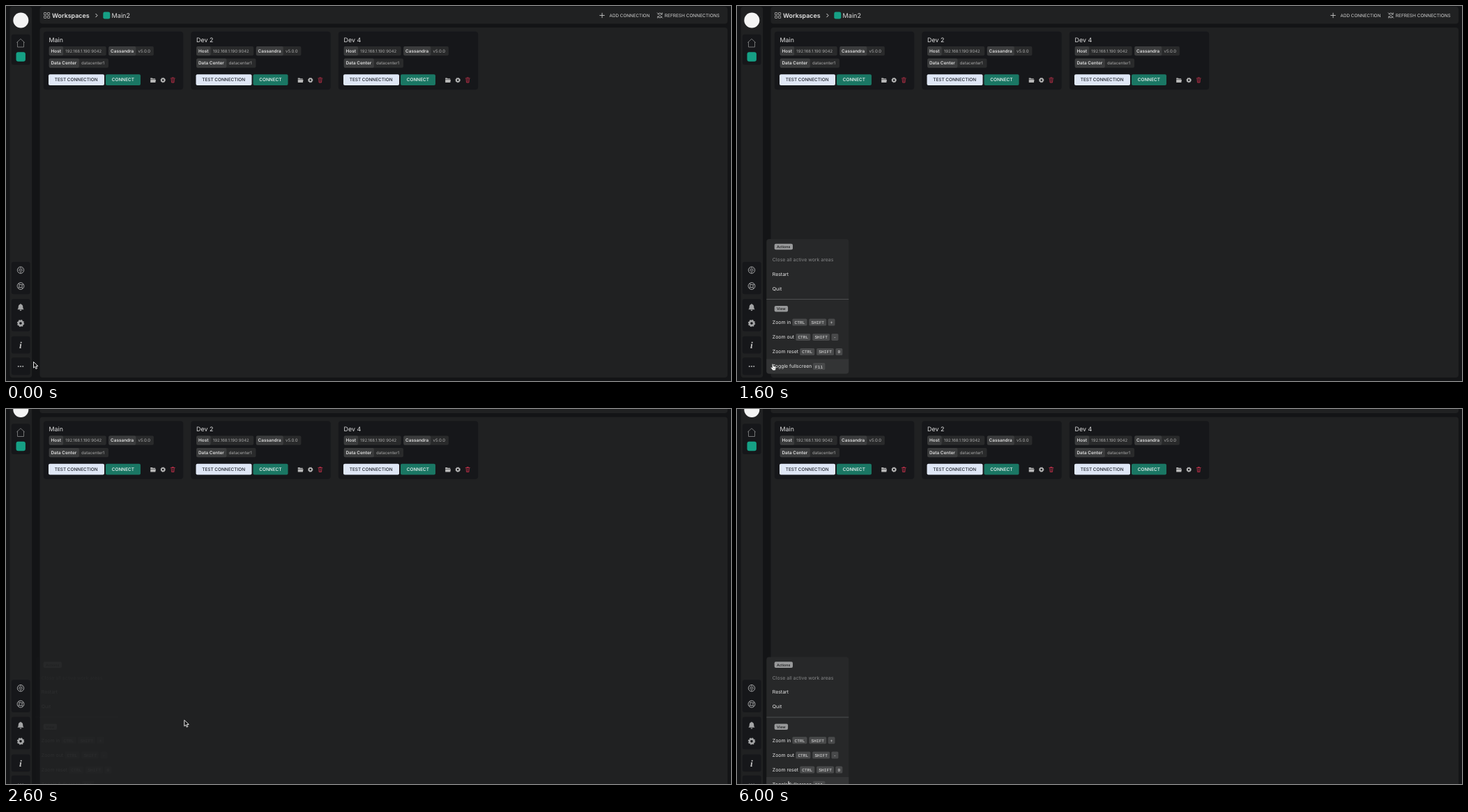
Write an HTML page that moves like this. It is 1040x539 px and loops after 6300 ms.

```html
<!DOCTYPE html>
<html lang="en">
<head>
<meta charset="utf-8">
<title>Workspaces</title>
<style>
  html, body { margin: 0; width: 100%; height: 100%; overflow: hidden; background: #131416; }
  svg { display: block; width: 100%; height: 100%; }
  text { font-family: Inter, "Noto Sans", sans-serif; text-rendering: geometricPrecision; white-space: pre; }
  .mono { font-family: "Liberation Mono", "DejaVu Sans Mono", monospace; }
  .serif { font-family: "Liberation Serif", "Noto Serif", serif; font-style: italic; }
</style>
</head>
<body>
<svg id="stage" viewBox="0 0 1040 539" xmlns="http://www.w3.org/2000/svg"></svg>
<script>
(() => {
const LOOP = 6300;
const PAGE = '#131416', PANEL = '#202122', BOX = '#16171a', ICON = '#a4a5a6';

// Shape helpers
const rect = (x, y, w, h, fill, r = 0, more = '') =>
  `<rect x="${x}" y="${y}" width="${w}" height="${h}" rx="${r}" fill="${fill}" ${more}/>`;
const line = (d, color, w = 1, more = '') =>
  `<path d="${d}" fill="none" stroke="${color}" stroke-width="${w}" stroke-linecap="round" stroke-linejoin="round" ${more}/>`;
const solid = (d, fill) => `<path d="${d}" fill="${fill}"/>`;
const disc = (x, y, r, fill) => `<circle cx="${x}" cy="${y}" r="${r}" fill="${fill}"/>`;
const ring = (x, y, r, color, w = 1, more = '') =>
  `<circle cx="${x}" cy="${y}" r="${r}" fill="none" stroke="${color}" stroke-width="${w}" ${more}/>`;
// Text whose capitals are centred on cy
const text = (x, cy, str, size, fill, weight = 400, more = '') =>
  `<text x="${x}" y="${(cy + size * 0.364).toFixed(2)}" font-size="${size}" font-weight="${weight}" fill="${fill}" ${more}>${str}</text>`;
const gear = (x, y, r, color) => {
  const tooth = 2 * Math.PI * r * 0.88 / 16;
  return ring(x, y, r * 0.6, color, r * 0.5) +
    ring(x, y, r * 0.88, color, r * 0.24, `stroke-dasharray="${tooth}"`);
};

function header() {
  let s = rect(48.5, 1, 986.5, 24.5, PANEL, 4);
  for (const [x, y] of [[54.5, 9.5], [59.5, 9.5], [54.5, 14.3], [59.5, 14.3]])
    s += rect(x, y, 3.2, 3.2, 'none', 0.4, 'stroke="#b5b5b5" stroke-width=".8"');
  s += text(66, 13.4, 'Workspaces', 8.9, '#e6e6e6', 600);
  s += line('M128.8 11.3l2.2 2.3l-2.2 2.3', '#ddd', 1);
  s += rect(139.3, 8.6, 10, 10, '#16a085', 2.4);
  s += text(151.6, 13.8, 'Main2', 9.1, '#dcdcdc');
  s += line('M851.8 13.5h6.6M855.1 10.2v6.6', '#c8c8c8', 0.9);
  s += text(865.6, 13.4, 'ADD CONNECTION', 6.3, '#d2d2d2');
  s += line('M935.2 15.4A3.3 3.3 0 0 0 941 15M940.8 11.7A3.3 3.3 0 0 0 935 12M941.2 9.8v2.2h-2.2M934.8 17.2V15h2.2M934.2 9.8l7.4 7.4', '#c8c8c8', 0.8);
  return s + text(944.8, 13.4, 'REFRESH CONNECTIONS', 6.5, '#d2d2d2');
}

const tag = (x, y, w, split, label, value, size) =>
  rect(x, y, w, 13.4, '#292a2b', 2) + rect(x, y, split, 13.4, '#3b3c3d', 2) +
  text(x + 2.8, y + 6.6, label, 6.4, '#dedede', 600) +
  text(x + split + 3.2, y + 6.6, value, size, '#a9a9a9');

function card(name, i) {
  return `<g transform="translate(${i * 211.5})">` +
    rect(53.8, 36.7, 200.4, 83.6, BOX, 4) +
    text(61.6, 48.4, name, 8.9, '#e2e2e2') +
    tag(61.7, 57.9, 82, 20.4, 'Host', '192.168.1.190:9042', 5.95) +
    tag(147.3, 57.9, 64.6, 39, 'Cassandra', 'v5.0.0', 6.05) +
    tag(61.7, 75.4, 85.3, 43.2, 'Data Center', 'datacenter1', 6.05) +
    rect(61, 98.2, 80, 15.8, '#dfe7f6', 2) +
    text(69.7, 106.1, 'TEST CONNECTION', 6.45, '#20242c', 500) +
    rect(143, 98.2, 50, 15.8, '#1a7764', 2) +
    text(151.8, 106.1, 'CONNECT', 6.45, '#f2f6f5', 500) +
    solid('M207.2 103.4h2.6l.8.9h3.6v1.2h-7z', '#b9b9b9') +
    solid('M207.2 106h7.8l-.7 4h-7.1z', '#b9b9b9') +
    gear(225.2, 106.6, 3.7, '#b9b9b9') +
    line('M236.3 104h6M238.2 103h2.2', '#a62c42', 1) +
    line('M237.2 105.2l.4 4.8h3.4l.4-4.8M239.3 105.5v4', '#a62c42', 1) + '</g>';
}

function workspace() {
  return `<rect id="side" x="5.5" y="1" width="31.7" height="533" rx="4" fill="${PANEL}"/>` +
    `<rect id="main" x="48.5" y="31" width="986.5" height="503" rx="4" fill="${PANEL}"/>` +
    header() + disc(21.3, 20.5, 11, '#f4f4f4') +
    rect(7.8, 40.8, 26.8, 43.7, BOX, 3) +
    line('M15.6 52.3l5.4-5l5.4 5M16.5 51.6v7.4h9v-7.4', '#7d7e7f', 0.9) +
    rect(14.5, 66.2, 13.4, 13.6, '#16a085', 3) +
    ['Main', 'Dev 2', 'Dev 4'].map(card).join('');
}

function tools() {
  let s = '';
  for (const [y, h] of [[367.7, 46.6], [421, 46.6], [474.8, 24.8], [505.2, 25]])
    s += rect(7.8, y, 26.8, h, BOX, 3);
  s += ring(21, 379.6, 4.7, ICON, 1) + line('M21 375.5v8.2M18.6 377.6l1.2 1l-1.6 1.2l1.6 1.4M23.4 377.6l-1.2 1l1.6 1.2l-1.6 1.4', ICON, 0.8);
  s += ring(21, 402.5, 4.9, ICON, 1) + ring(21, 402.5, 2.3, ICON, 1) + ring(21, 402.5, 3.6, ICON, 1.8, 'stroke-dasharray="1.1 4.55" stroke-dashoffset="-2.3"');
  s += solid('M16.4 436.2c1.6-1.4 1.1-3.3 1.5-4.9c.3-1.5 1.5-2.4 2.5-2.6c0-1.2 1.2-1.2 1.2 0c1 .2 2.2 1.1 2.5 2.6c.4 1.6-.1 3.5 1.5 4.9zM19.6 436.8h2.8a1.4 1.4 0 0 1-2.8 0z', ICON);
  s += gear(21, 456, 5.2, ICON);
  s += text(19, 487.2, 'i', 13.5, '#c4c4c4', 700, 'class="serif"');
  return s + `<g id="dots" fill="${ICON}">` +
    [17.8, 21, 24.2].map(x => `<circle cx="${x}" cy="518" r="1.1"/>`).join('') + '</g>';
}

const key = (x, cy, str) => {
  const w = str.length * 3.72 + 6.2;
  return rect(x, cy - 5, w, 10, '#48494a', 1.6) +
    text(x + 3.1, cy + 0.2, str, 6.2, '#e4e4e4', 400, 'class="mono"');
};
const badge = (cy, str, w) =>
  rect(53.7, cy - 4.3, w, 8.6, '#98999a', 2) + text(57, cy, str, 5.25, '#232425', 600);

function menu() {
  const item = (cy, str, fill = '#e6e6e6') => text(50.8, cy, str, 6.95, fill);
  let s = rect(42.3, 335, 118, 193.6, '#272829', 4);
  s += `<path id="hover" d="M42.3 507.5h118v17a4 4 0 0 1-4 4h-110a4 4 0 0 1-4-4z" fill="#333435"/>`;
  s += badge(346, 'Actions', 26.3) + item(364.8, 'Close all active work areas', '#868788') +
    item(385.3, 'Restart') + item(406, 'Quit');
  s += rect(42.3, 421, 118, 0.9, '#525354') + badge(435.2, 'View', 19.4);
  const rows = [[454.4, 'Zoom in', 79.4, '+'], [475.7, 'Zoom out', 84.3, '-'], [496.8, 'Zoom reset', 90.2, '0']];
  for (const [cy, name, x, last] of rows)
    s += item(cy, name) + key(x, cy + 0.2, 'CTRL') + key(x + 24, cy + 0.2, 'SHIFT') + key(x + 51.2, cy + 0.2, last);
  return s + item(517.9, 'Toggle fullscreen') + key(109, 518.1, 'F11');
}

const arrow = '<path d="M.5 .5v8.6l2-1.8l1.4 3.2l1.6-.7l-1.4-3.1h2.9z" fill="#111" stroke="#fff" stroke-width=".9" stroke-linejoin="round"/>';
const hand = '<path d="M2.2 1c0-1 1.5-1 1.6 0l.3 2.8l2.7.5c.9.2 1.2.7 1.1 1.6l-.4 2.3l-.8 1.6h-3.3l-2.7-3.3c-.6-.9.4-1.6 1.1-1l.8.7z" fill="#fff" stroke="#222" stroke-width=".5" stroke-linejoin="round"/><path d="M4.6 6v2.2M6 6v2.2" stroke="#555" stroke-width=".4"/>';

document.getElementById('stage').innerHTML =
  '<use id="stale" href="#app"/>' +
  `<g id="view"><g id="app">${rect(0, 0, 1040, 539, PAGE)}<g id="upper">${workspace()}</g>` +
  `<g id="lower">${tools()}<g id="menu">${menu()}</g></g></g></g>` +
  `<g id="cursor"><g id="arrow">${arrow}</g><g id="hand">${hand}</g></g>`;

// Steps: time, then values that hold until the next entry
const cursorSteps = [
  [0, 39, 511, 'arrow'], [100, 35, 512, 'arrow'], [200, 27, 514, 'hand'], [300, 21, 514.5, 'hand'],
  [1500, 35, 514.3, 'hand'], [1600, 48, 514, 'hand'], [2200, 152.5, 478, 'hand'],
  [2300, 187, 468, 'arrow'], [2400, 221, 457.5, 'arrow'], [2500, 245, 450, 'arrow'], [2600, 255.3, 446.7, 'arrow'],
  [3800, 255.5, 445.6, 'arrow'], [4200, 234, 463, 'arrow'], [4300, 172, 500, 'arrow'], [4400, 120, 523, 'arrow'],
  [4800, 27, 532.5, 'hand'], [6000, 71, 534.5, 'hand']
];
const menuSteps = [
  [0, 0], [800, 0.22], [900, 0.42], [1000, 0.6], [1100, 0.75], [1200, 0.87], [1300, 0.95], [1400, 1],
  [2300, 0.75], [2400, 0.45], [2500, 0.2], [2600, 0.06], [3800, 0], [6000, 1]
];
const layoutSteps = [[0, 'window'], [2200, 'lifted'], [2300, 'full']];
const hoverSteps = [[0, 0], [1500, 1], [2300, 0], [6000, 1]];
const dotSteps = [[0, ICON], [200, '#e8e8e8'], [1500, ICON], [4800, '#e8e8e8'], [6000, ICON]];

const at = (steps, t) => steps.filter(s => s[0] <= t).pop().slice(1);
const set = (id, name, value) => document.getElementById(id).setAttribute(name, value);
const show = (id, on) => set(id, 'visibility', on ? 'visible' : 'hidden');

function draw(t) {
  const [layout] = at(layoutSteps, t);
  const full = layout === 'full', lifted = layout === 'lifted';
  set('view', 'transform', lifted ? 'translate(-.7 -20)' : '');
  set('stale', 'display', lifted ? 'inline' : 'none');
  set('upper', 'transform', full ? 'translate(0 -19.5)' : '');
  set('lower', 'transform', full ? 'translate(0 21.6)' : '');
  set('side', 'height', full ? 580 : 533);
  set('main', 'height', full ? 550 : 503);

  set('menu', 'opacity', at(menuSteps, t)[0]);
  set('hover', 'opacity', at(hoverSteps, t)[0]);
  set('dots', 'fill', at(dotSteps, t)[0]);

  const [x, y, kind] = at(cursorSteps, t);
  set('cursor', 'transform', `translate(${x} ${y})`);
  show('arrow', kind === 'arrow');
  show('hand', kind === 'hand');
}

const start = performance.now();
function tick() {
  draw((performance.now() - start) % LOOP);
  requestAnimationFrame(tick);
}
tick();
})();
</script>
</body>
</html>
```
